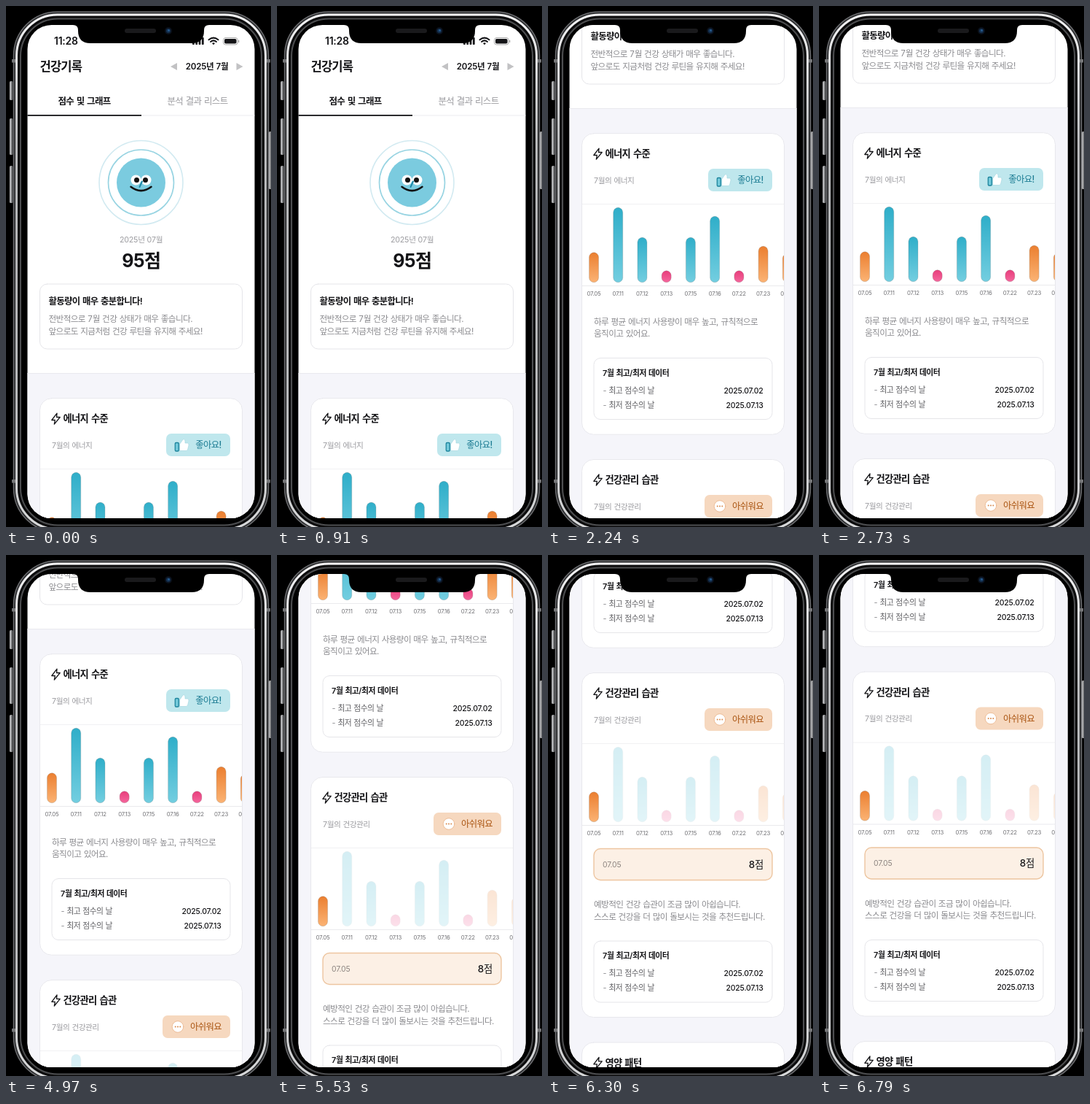
Write an HTML page that moves like this. It is 364x714 px and loops after 8.12 s.

```html
<!DOCTYPE html>
<html lang="ko">
<head>
<meta charset="utf-8">
<style>
html, body { margin: 0; width: 100%; height: 100%; overflow: hidden; background: #000; }
svg { display: block; width: 364px; height: 714px; }
text { white-space: pre; }
.ko { font-family: "Noto Sans CJK KR", "Noto Sans CJK", sans-serif; letter-spacing: -.053em; word-spacing: .06em; }
.la { font-family: Inter, sans-serif; letter-spacing: -.02em; }
</style>
</head>
<body>
<svg id="stage" viewBox="0 0 364 714"></svg>
<script>
const LOOP = 8120;
// [time, scroll offset]: each flick starts slowly, rushes, then settles
const SCROLL = [
  [0, 0],
  [1820, 38.5], [1890, 262], [1960, 361], [2240, 363], [2590, 363.5], [2730, 364],
  [4970, 402], [5040, 595], [5110, 678], [5530, 680], [5670, 680.5], [5810, 681],
  [6160, 702], [6230, 784], [6300, 823], [6720, 824], [6790, 824.5]
];
const INK = '#141417', GREY = '#8b8b8f', PALE = '#9c9ca0', LINE = '#e5e5e9';

const rect = (x, y, w, h, r, fill, extra = '') =>
  `<rect x="${x}" y="${y}" width="${w}" height="${h}" rx="${r}" fill="${fill}" ${extra}/>`;
const circle = (x, y, r, fill, extra = '') =>
  `<circle cx="${x}" cy="${y}" r="${r}" fill="${fill}" ${extra}/>`;
const path = (d, fill, extra = '') => `<path d="${d}" fill="${fill}" ${extra}/>`;
const stroke = (color, width = 1) =>
  `stroke="${color}" stroke-width="${width}" stroke-linecap="round" stroke-linejoin="round"`;

// y is the middle of the line; Korean and Latin runs get their own font
function text(x, y, str, size, fill = INK, weight = 400, anchor = 'start') {
  const runs = str.match(/[가-힣 ]+|[^가-힣 ]+/g)
    .map(s => `<tspan class="${/[가-힣 ]/.test(s) ? 'ko' : 'la'}">${s}</tspan>`).join('');
  return `<text x="${x}" y="${y + size * .36}" font-size="${size}" fill="${fill}" font-weight="${weight}" text-anchor="${anchor}">${runs}</text>`;
}

const gradient = (id, ...colors) =>
  `<linearGradient id="${id}" x2="0" y2="1">${colors.map((c, i) =>
    `<stop offset="${i / (colors.length - 1)}" stop-color="${c}"/>`).join('')}</linearGradient>`;

function header() {
  let s = text(66, 48, '11:28', 14, INK, 600);
  for (let i = 0; i < 4; i++) s += rect(256 + 4.3 * i, 49 - 2 * i, 2.8, 4 + 2 * i, .8, INK);
  s += path('M278.5 46.3Q285 41 291.5 46.3M281 49Q285 45.8 289 49', 'none', stroke(INK, 2));
  s += path('M283 51L285 53.3L287 51Q285 49.5 283 51Z', INK);
  s += rect(298.5, 43.5, 19.5, 9.5, 3, '#fff', stroke('#aaa'));
  s += rect(300, 45, 16.5, 6.5, 1.8, INK) + rect(319, 46.5, 1.3, 3.5, .6, '#aaa');
  s += text(46.5, 83, '건강기록', 16.6, INK, 700);
  s += path('M226 83L235 78V88Z', '#c2c2c4') + path('M325.5 83L316.5 78V88Z', '#c2c2c4');
  s += text(305, 83, '2025년 7월', 11.6, INK, 600, 'end');
  s += text(107.5, 130.5, '점수 및 그래프', 12.5, INK, 600, 'middle');
  s += text(263, 130.5, '분석 결과 리스트', 12.5, PALE, 400, 'middle');
  return s + rect(186, 149.5, 156, 1, 0, '#ececef') + rect(29, 149, 157, 1.8, 0, INK);
}

function score() {
  let s = circle(185.5, 242, 57.5, 'none', stroke('#d2eaf1', 1.6));
  s += circle(185.5, 242, 45, 'none', stroke('#98d4e2', 1.7));
  s += circle(185.5, 242, 33.5, '#7bcbdf');
  for (const x of [178.5, 192.5]) s += circle(x, 238.5, 7, '#fff');
  s += circle(179.5, 238.5, 3.5, '#111') + circle(191.5, 238.5, 3.5, '#111');
  s += path('M187 240.5L183.5 248', 'none', stroke('#1e88a8', 2));
  s += path('M171.5 247.8Q185.5 258.5 199.5 247.8', 'none', stroke('#111', 2.5));
  s += text(185.5, 320, '2025년 07월', 10.7, PALE, 400, 'middle');
  s += text(185.5, 349, '95점', 25, INK, 700, 'middle');
  s += rect(46.5, 381, 278, 89, 10, '#fff', stroke(LINE));
  s += text(58.5, 404.5, '활동량이 매우 충분합니다!', 12.4, INK, 600);
  s += text(58.5, 429, '전반적으로 7월 건강 상태가 매우 좋습니다.', 11.65, GREY);
  return s + text(58.5, 445.5, '앞으로도 지금처럼 건강 루틴을 유지해 주세요!', 11.65, GREY);
}

function card(y, h, title) {
  return rect(46.5, y, 278, h, 16, '#fff', stroke('#e8e8ed')) +
    `<g transform="translate(0 ${y})">` +
    path('M70 20.5L62.8 29.8H67.3L66.3 35.5L74.2 25.8H69.5Z', 'none', stroke(INK, 1.3)) + '</g>' +
    text(78.5, y + 27.8, title, 13.3, INK, 600);
}

function chart(bottom, active) {
  const heights = [41.5, 103, 62, 16.5, 62, 91, 16.5, 50, 40];
  const kinds = 'obbpbbpoo';
  const days = ['05', 11, 12, 13, 15, 16, 22, 23, 25];
  let s = rect(47, bottom - 108, 277, 1, 0, '#f1f1f3') + rect(47, bottom + 4, 277, 1, 0, '#eaeaed');
  heights.forEach((h, i) => {
    const x = 63 + 33.23 * i;
    const dim = active >= 0 && i !== active ? .2 : 1;
    s += rect(x - 6.5, bottom - h + .3, 13, h - .6, 6.5, `url(#${kinds[i]})`, `opacity="${dim}" ${stroke('#6664', .8)}`);
    s += text(x, bottom + 15.5, '07.' + days[i], 7.8, '#707074', 400, 'middle');
  });
  return `<g clip-path="url(#cardClip)">${s}</g>`;
}

function extremes(y) {
  let s = rect(63, y, 245, 84, 9, '#fff', stroke(LINE));
  s += text(75, y + 20.5, '7월 최고/최저 데이터', 10.8, INK, 600);
  [['최고', '02'], ['최저', 13]].forEach(([name, day], i) => {
    const row = y + 44.5 + 20 * i;
    s += text(75.5, row, '-', 10.8, GREY) + text(83.5, row, name + ' 점수의 날', 10.8, '#606064');
    s += text(295.5, row, '2025.07.' + day, 10.5, INK, 500, 'end');
  });
  return s;
}

function energy() {
  let s = card(537.7, 412.5, '에너지 수준');
  s += text(63, 602, '7월의 에너지', 10.7, PALE);
  s += rect(220, 586, 88, 31, 7, '#bfe7ed');
  s += rect(232.3, 598.5, 5, 11.5, 1.3, '#73c9da', stroke('#1d849c', 1.3));
  s += path('M239 600L243 594Q246.5 592.5 246 599H249.5Q251.5 599.5 251 602L249.5 608Q249 609.5 247 609.5H239Z', '#fff', stroke('#9ed3de', .6));
  s += text(296, 601.7, '좋아요!', 12.4, '#1c7c93', 500, 'end');
  s += chart(742, -1);
  s += text(63, 795.5, '하루 평균 에너지 사용량이 매우 높고, 규칙적으로', 11.65, GREY);
  return s + text(63, 812, '움직이고 있어요.', 11.65, GREY) + extremes(845.5);
}

function habits() {
  let s = card(984.5, 472, '건강관리 습관');
  s += text(63, 1049, '7월의 건강관리', 10.7, PALE);
  s += rect(215, 1033, 93, 31, 7, '#f6d8bf');
  s += circle(236, 1048.5, 7.8, '#fff', stroke('#ebb890', .9));
  for (const x of [232.7, 236, 239.3]) s += circle(x, 1048.5, 1, '#d98a4e');
  s += text(296, 1048.7, '아쉬워요', 12.4, '#a9530f', 500, 'end');
  s += chart(1189, 0);
  s += rect(63, 1225.5, 245, 43, 9, '#fcf0e5', stroke('#edc5a0', 1.4));
  s += text(75, 1247, '07.05', 10.4, '#8c8580') + text(295.5, 1247, '8점', 13.3, INK, 500, 'end');
  s += text(63, 1302, '예방적인 건강 습관이 조금 많이 아쉽습니다.', 11.65, GREY);
  s += text(63, 1318.7, '스스로 건강을 더 많이 돌보시는 것을 추천드립니다.', 11.65, GREY);
  return s + extremes(1352);
}

function phone() {
  const ring = (inset, r, fill, line) =>
    rect(10.5 + inset, 8 + inset, 350 - 2 * inset, 713 - 2 * inset, r, fill, line);
  let s = '';
  for (const [y, h] of [[103, 26], [154, 50], [219, 51]]) s += rect(5, y, 4.5, h, 1.5, 'url(#button)');
  s += rect(361, 172, 4, 79, 1.5, 'url(#button)');
  s += ring(0, 60, '#2b2c2e', stroke('#6c6d70', 1.5));
  s += ring(4, 56, '#0c0c0d', stroke('url(#steel)', 3));
  s += ring(9.5, 51, '#000', stroke('#4d4e50', 2));
  for (const y of [73, 649]) s += rect(8, y, 5, 4.5, 0, '#77787a') + rect(358, y, 5, 4.5, 0, '#77787a');
  return s;
}

const notch = path('M92 26Q99 26 99 33V34Q99 51 116 51H255Q272 51 272 34V33Q272 26 279 26Z', '#000') +
  rect(163, 31, 43, 6, 3, '#1a1a1c') + circle(223, 34, 5, '#0b111c') +
  circle(223, 34, 3, '#143252') + circle(223.5, 33.5, 1.2, '#2c639a');

document.getElementById('stage').innerHTML = `<defs>
  ${gradient('b', '#2faec9', '#73cee0')}${gradient('o', '#eb7f30', '#fbb374')}${gradient('p', '#e83e7c', '#f4669c')}
  ${gradient('steel', '#f4f4f5', '#b9babc', '#b4b5b7', '#b9babc', '#d8d9da')}
  <linearGradient id="button"><stop stop-color="#d5d6d8"/><stop offset="1" stop-color="#4a4b4d"/></linearGradient>
  <clipPath id="screenClip">${rect(29.5, 26, 312, 676, 33, '#fff')}</clipPath>
  <clipPath id="cardClip">${rect(47, 600, 277, 700, 0, '#fff')}</clipPath>
</defs>
${phone()}
<g clip-path="url(#screenClip)">
  ${rect(29, 26, 313, 676, 0, '#fff')}
  <g id="page">
    ${rect(29, 503, 313, 1100, 0, '#f5f5fa')}${rect(29, 503, 313, 1, 0, '#e9e9ee')}
    ${header()}${score()}${energy()}${habits()}${card(1491, 420, '영양 패턴')}
  </g>
</g>
${notch}`;

const page = document.getElementById('page');
function draw() {
  const t = performance.now() % LOOP;
  const y = SCROLL.filter(([at]) => at <= t).pop()[1];
  page.setAttribute('transform', `translate(0 ${-y})`);
  requestAnimationFrame(draw);
}
draw();
</script>
</body>
</html>
```
